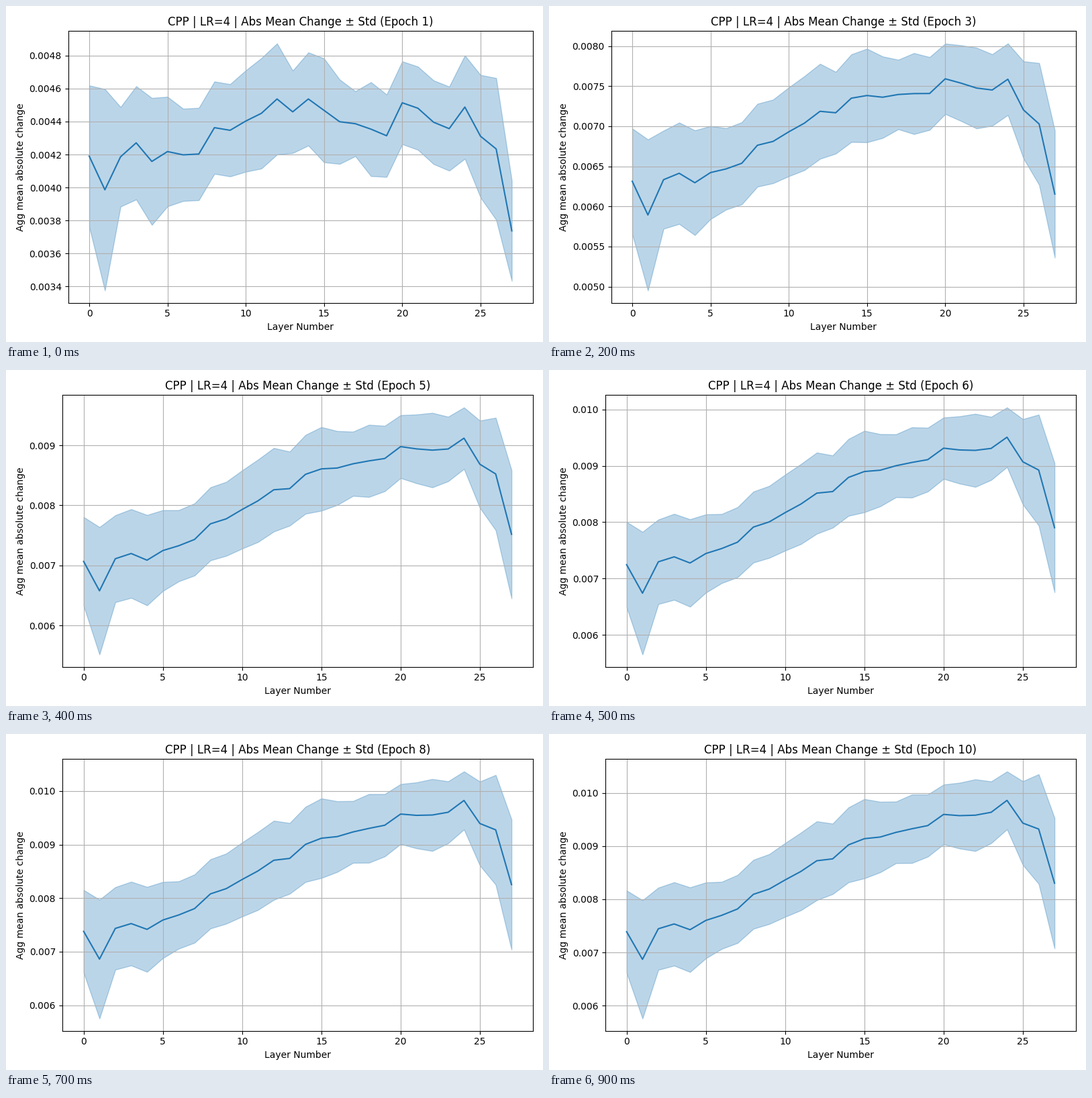
A matplotlib script that plays this animation: 800x500 px, repeating every 1000 ms.

```python
import numpy as np
import matplotlib.pyplot as plt
from matplotlib.animation import FuncAnimation

BLUE = "#1f77b4"
EPOCHS = 10
LAYERS = np.arange(28)
DEPTH = LAYERS / LAYERS[-1]


def through(**points):
    """Straight segments over the layers through points named L<layer>."""
    return np.interp(LAYERS, [int(name[1:]) for name in points], list(points.values()))


# All profiles are in millionths: the first epoch and the growth up to the last.
start_mean = np.array([
    4190, 3986, 4186, 4271, 4158, 4218, 4198, 4203, 4363, 4347, 4403, 4450, 4537, 4459,
    4537, 4468, 4399, 4387, 4354, 4314, 4514, 4481, 4396, 4357, 4488, 4311, 4234, 3737])
mean_growth = through(L0=3200, L1=2885, L2=3260, L4=3270, L10=3960, L13=4300, L15=4670,
                      L19=5070, L21=5090, L24=5370, L25=5120, L26=5085, L27=4565)
start_std = through(L0=429, L1=611, L2=302, L4=385, L6=280, L9=280, L11=335, L12=337,
                    L13=250, L15=315, L17=197, L18=285, L19=250, L23=255, L26=430, L27=304)
std_growth = through(L0=345, L1=500, L6=350, L15=430, L20=310, L22=420, L24=230,
                     L26=600, L27=923)


def progress(frame):
    """Share of the growth reached: it eases out, more slowly in deep layers."""
    remaining = 1 - frame / (EPOCHS - 1)
    power = 3.75 - 0.2 * DEPTH - 0.55 * DEPTH**8
    head_start = 1.6 * (1 - DEPTH) * remaining**4
    return 1 - remaining**(power + head_start)


fig = plt.figure(figsize=(8, 5), dpi=100)


def draw(frame):
    share = progress(frame)
    mean = (start_mean + mean_growth * share) * 1e-6
    std = (start_std + std_growth * share) * 1e-6

    fig.clear()
    ax = fig.add_subplot()
    ax.plot(LAYERS, mean, color=BLUE)
    ax.fill_between(LAYERS, mean - std, mean + std, color=BLUE, alpha=0.3)
    ax.set_title(f"CPP | LR=4 | Abs Mean Change ± Std (Epoch {frame + 1})")
    ax.set_xlabel("Layer Number")
    ax.set_ylabel("Agg mean absolute change")
    ax.grid(True)
    fig.tight_layout()
    return []


anim = FuncAnimation(fig, draw, frames=EPOCHS, init_func=lambda: [],
                     interval=100, repeat=True, repeat_delay=0)
plt.show()
```
